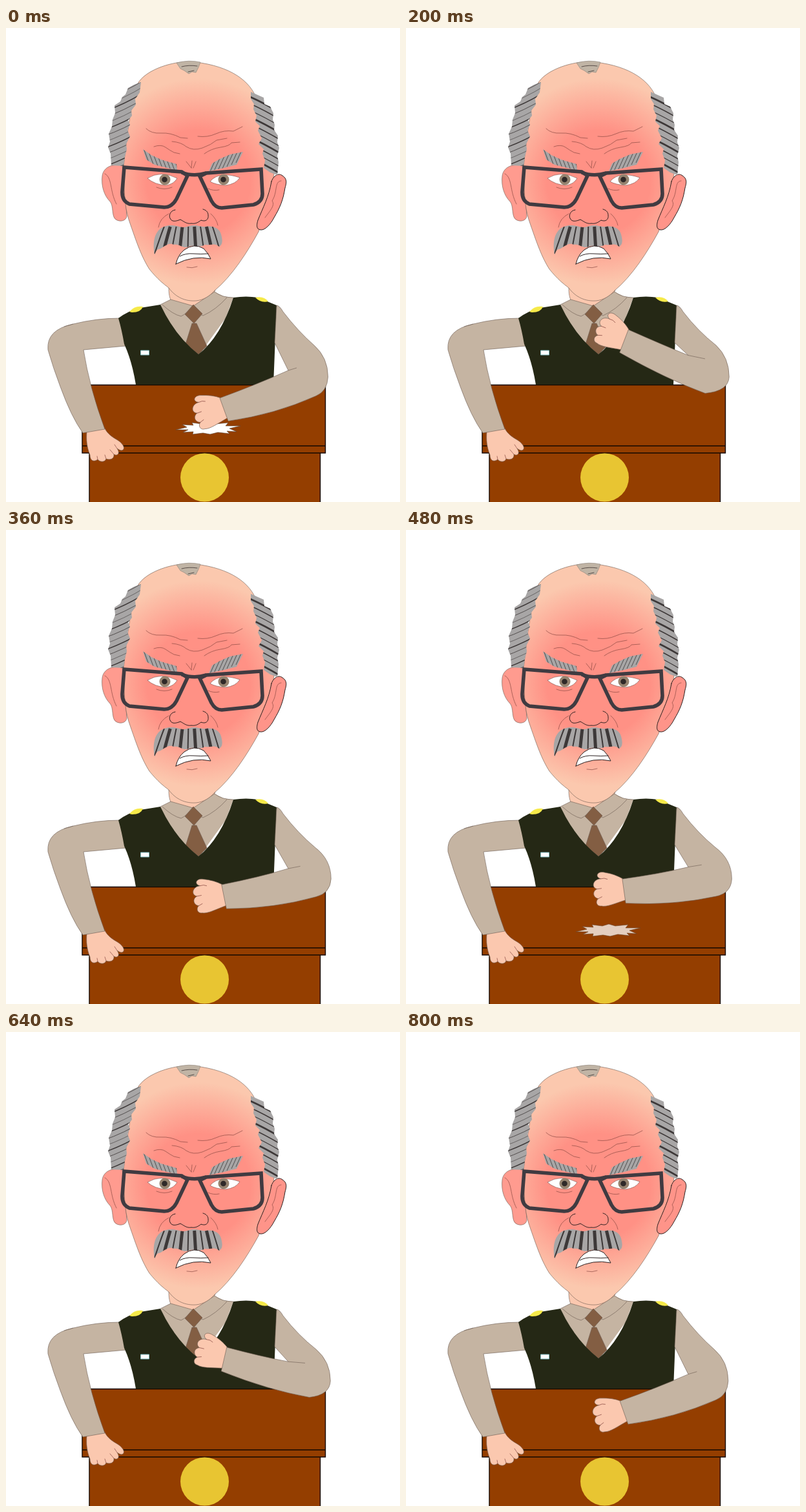
Animation of 610x735 px, one loop 840 ms. Source, as an HTML page:

```html
<!DOCTYPE html>
<html lang="en">
<head>
<meta charset="utf-8">
<title>Angry speech</title>
<style>
html, body { margin: 0; width: 100%; height: 100%; overflow: hidden; background: #fff; }
svg { display: block; width: 100vw; height: 100vh; }
.thin { stroke: #6b5a50; stroke-width: .6; }
.line { fill: none; stroke: #8a4a42; stroke-width: .7; stroke-linecap: round; }
.skin { fill: #fbc8af; }
.cloth { fill: #c5b4a2; }
.hair { fill: #a8a6a6; }
.wood { fill: #943e00; stroke: #140800; stroke-width: 1.4; }
.rim { fill: none; stroke: #403b41; stroke-width: 5.6; stroke-linejoin: miter; }
.ink { fill: none; stroke: #2a2020; stroke-width: 1; stroke-linecap: round; }
</style>
</head>
<body>
<svg viewBox="0 0 610 735">
  <defs>
    <radialGradient id="flush" gradientUnits="userSpaceOnUse" cx="298" cy="238" r="160">
      <stop offset=".5" stop-color="#ff9185"/>
      <stop offset="1" stop-color="#fbc8ae"/>
    </radialGradient>
    <clipPath id="cutLeft"><path id="hairLeft" d="M209 84L198 88L189 93L185 103L180 107L177 114L168 120L169 132L165 142L164 153L159 164L161 176L158 185L162 195L163 213L182 214L184 200L187 188L186 180L192 168L188 158L192 150L189 143L195 136L194 128L201 119L200 110L207 100Z"/></clipPath>
    <clipPath id="cutRight"><path id="hairRight" d="M379 99L390 104L399 108L400 118L409 122L414 132L413 142L416 150L415 158L421 167L420 177L423 186L420 198L422 208L420 228L409 224L399 217L401 205L397 195L399 188L391 180L396 171L390 159L393 152L386 145L388 136L383 126L384 118L379 110Z"/></clipPath>
    <clipPath id="cutBrowL"><path id="browL" d="M212 188L225 197L240 204L264 211L265 221L246 216L230 212L217 204Z"/></clipPath>
    <clipPath id="cutBrowR"><path id="browR" d="M367 192L347 196L331 203L319 210L314 222L338 217L357 212Z"/></clipPath>
    <clipPath id="cutTache"><path id="tache" d="M230 352C227 335 229 320 238 312C248 304 258 306 265 307C273 310 278 309 284 307C294 304 301 309 309 308C321 306 331 311 333 320C336 331 335 336 330 339C322 332 316 338 308 336C298 342 292 335 283 339C275 343 268 334 260 336C250 331 243 342 236 343C233 344 231 348 230 352Z"/></clipPath>
  </defs>
  <rect width="610" height="735" fill="#fff"/>

  <!-- neck, shirt, tie -->
  <path class="skin thin" d="M252 402C252 412 253 418 256 424L290 432L318 421L324 406Z"/>
  <path class="cloth" d="M239 429L255 421L290 431L323 409L337 416L352 418L340 450L298 508L255 470Z"/>
  <path class="thin" fill="none" d="M239 429L255 421L290 431L323 409Q334 418 352 418"/>
  <path class="thin" fill="none" d="M242 429Q258 444 271 447Q280 443 290 430Q298 444 305 446Q325 437 342 418"/>
  <path class="thin" fill="#835e43" d="M290 429L304 443L291 458L277 444Z"/>
  <path class="thin" fill="#835e43" d="M288 458L295 458L311 493L298 506L278 490Z"/>

  <!-- head -->
  <path class="thin" fill="#ff9b8f" d="M180 213C164 210 151 216 149 229C147 245 152 260 161 269C167 276 163 292 170 297C178 302 187 298 187 291L183 240Z"/>
  <path class="line" d="M153 226C165 232 160 252 171 273"/>
  <path class="thin" fill="url(#flush)" d="M283 52C250 53 215 67 204 86C190 130 185 190 182 215C183 250 183 275 190 297C203 335 210 355 222 374C235 390 243 396 252 403C263 418 278 424 294 423C306 422 316 415 322 408C350 385 374 347 391 316C400 290 410 260 415 226C400 190 396 140 386 105C374 78 340 56 283 52Z"/>
  <path class="ink" style="fill:#ff9489" d="M411 238C414 229 422 224 428 229C436 234 434 241 432 248C429 267 424 279 415 294C410 304 401 314 394 313C387 312 388 305 390 298C398 278 407 262 411 238Z"/>
  <path class="line" d="M426 237C415 238 421 254 412 268C417 275 409 283 401 294"/>
  <g id="locks"></g>
  <path fill="#c0b4a5" stroke="#8c8177" stroke-width=".6" d="M264 54Q283 49 301 53L298 61L294 69L288 68L283 71L276 66L270 63Z"/>
  <path class="ink" style="stroke-width:.7" d="M272 60Q283 57 296 59M282 68L291 66"/>

  <path class="line" d="M217 156Q225 164 240 163T270 170L281 171M297 168Q312 170 325 164T352 160L366 153M257 176Q271 177 279 184Q290 191 304 186T326 174L342 171M229 184Q240 180 247 185T260 193L269 195M307 195Q318 187 332 185T349 178L362 177M279 207L287 217M288 206L287 217M294 207L290 217"/>
  <path class="line" d="M233 247Q245 252 257 247M313 249Q321 253 330 251M252 288Q238 295 236 309M317 288Q326 296 328 306M280 371Q288 373 296 370"/>
  <path class="ink" d="M262 282C254 283 252 291 254 295C257 302 265 299 270 297C277 301 280 304 287 303C294 304 298 301 302 298C309 301 314 297 313 290C313 285 309 282 305 281"/>

  <g stroke="#7c4a44" stroke-width=".6">
    <path fill="#fff" d="M219 233Q240 220 265 233Q260 242 248 244Q230 243 219 233Z"/>
    <path fill="#fff" d="M316 238Q330 221 362 232Q356 242 340 244Q324 243 316 238Z"/>
  </g>
  <g fill="#95836f"><circle cx="246" cy="235" r="8.500"/><circle cx="337" cy="235" r="8.500"/></g>
  <g fill="#2f2928"><circle cx="245.500" cy="235" r="4.300"/><circle cx="336.500" cy="235" r="4.300"/></g>
  <path class="rim" d="M183 216L272 223L281 229L264 265Q257 278 245 278L191 273Q179 268 180 253Z"/>
  <path class="rim" d="M300 230L310 225L395 219L397 257Q397 270 383 274L334 279Q324 279 318 268Z"/>
  <path class="rim" d="M272 224Q290 231 310 225"/>

  <g id="shut">
    <path class="ink" style="fill:#fff" d="M263 366Q266 352 276 344Q291 333 306 342Q313 349 317 358Q290 352 263 366Z"/>
    <path class="ink" d="M269 354Q278 349 290 350T313 350"/>
  </g>
  <g id="open">
    <path class="ink" style="fill:#000" d="M263 366Q266 352 276 344Q291 333 306 342Q314 350 318 360Q292 367 263 366Z"/>
    <path fill="#fff" d="M273 348.500Q287 333 303 345Q287 350 273 348.500ZM264 366Q272 360 290 358L317 357L318 360Q292 367 264 366Z"/>
  </g>

  <!-- desk -->
  <path class="wood" d="M129 659H486.500V740H129ZM118 553.500H494.500V659H118ZM118 648H494.500"/>
  <circle cx="307.500" cy="697" r="37.500" fill="#e8c532"/>
  <path id="crack" fill="#fff" stroke="#5a4436" stroke-width=".6" d="M263 623L280 619L273 615L290 616L288 612L304 614L314 611L324 614L344 612L340 617L363 617L346 621L357 626L342 625L346 629L328 627L316 630L305 628L289 630L290 626L274 627L282 623Z"/>

  <!-- resting arm -->
  <path class="skin thin" d="M125 626L153 621C157 629 164 634 171 638C180 643 184 650 182 653C180 657 175 654 172 652C178 661 171 664 167 661C168 669 160 670 155 668C153 674 145 673 142 669C135 674 130 670 130 662C125 650 124 638 125 626Z"/>
  <path class="line" d="M172 652L168 646M167 661L161 654M155 668L153 662M142 669L141 664"/>
  <path class="cloth thin" d="M176 450Q140 450 104 459Q62 468 65 499Q73 527 84 556Q101 603 119 628L153 622Q129 557 120 499L186 493Z"/>
  <path class="thin" fill="none" d="M90 463L104 459"/>

  <!-- sweater -->
  <path fill="#252815" d="M174 450Q190 438 208 434L239 429Q262 478 298 506Q333 478 352 418Q372 415 390 418L419 430L414 553H201Q195 516 183 490Q179 467 174 450Z"/>
  <path fill="#f6ea4a" d="M191 440Q199 430 212 432Q209 441 195 441ZM386 418Q399 415 406 424Q395 427 386 418Z"/>
  <path fill="#fff" stroke="#7fbcc2" d="M208.500 500H221.500V507H208.500Z"/>

  <!-- striking arm -->
  <g id="fist">
    <path class="skin thin" d="M1-19C-6-25-16-30-26-33C-37-37-42-28-33-24C-45-25-50-13-41-9C-50-6-48 4-41 6C-47 10-45 18-38 18C-30 21-17 17 1 14Z"/>
    <path class="line" d="M-33-24Q-27-25-23-22M-41-9L-34-9M-41 6L-35 4"/>
  </g>
  <path id="sleeve" class="cloth thin"/>
  <path id="crease" class="thin" fill="none"/>
</svg>
<script>
const $ = id => document.getElementById(id);
const STEP = 40, LOOP = 840;

// Draws a lock of hair with n strands clipped to its shape.
function lock(shape, clip, n, strand) {
  let s = `<path class="hair" d="${$(shape).getAttribute("d")}"/><g clip-path="url(#${clip})" stroke="#3d3838" fill="none">`;
  for (let i = 0; i < n; i++) {
    const [d, w] = strand(i);
    s += `<path d="${d}" stroke-width="${w}"/>`;
  }
  $("locks").innerHTML += s + "</g>";
}
lock("hairLeft", "cutLeft", 13, i => {
  const y = 95 + i * 9.500;
  return [`M150 ${y + 16}Q183 ${y + 5} 215 ${y - 15}`, [.8, .6, 1.5][i % 3]];
});
lock("hairRight", "cutRight", 12, i => {
  const y = 97 + i * 10.500;
  return [`M375 ${y - 2}Q400 ${y + 9} 428 ${y + 26}`, [1.2, 2.6, 1.6][i % 3]];
});
lock("browL", "cutBrowL", 8, i => [`M${212 + i * 7} ${184 + i * 3}l9 24`, .8]);
lock("browR", "cutBrowR", 8, i => [`M${324 + i * 7} ${205 - i * 3}l-10 22`, .8]);
lock("tache", "cutTache", 9, i => {
  const x = 240 + i * 10.500, lean = (285 - x) * .22;
  return [`M${x + lean * .5} 308Q${x} 320 ${x - lean} 350`, i % 2 ? 5 : 2];
});

// Piecewise linear value through [time, value] pairs.
function along(keys, t) {
  for (let i = 1; i < keys.length; i++) {
    const [t0, v0] = keys[i - 1], [t1, v1] = keys[i];
    if (t <= t1) return v0 + (v1 - v0) * (t - t0) / (t1 - t0);
  }
  return keys[keys.length - 1][1];
}
const swing = [[0, 20], [40, 18], [80, 8], [120, -2], [200, -21], [400, 19.500],
  [440, 18], [480, 8], [560, -10.700], [600, -21], [800, 19.500], [840, 20]];
const fade = [[0, 1], [40, 1], [200, 0], [400, 0], [440, 1], [600, 0], [840, 0]];

function poseArm(deg) {
  const a = deg * Math.PI / 180;
  const down = Math.max(0, deg) / 20, up = Math.max(0, -deg) / 20;
  const cx = 337.500, cy = 540 + 142 * Math.tan(a);
  const sx = 19 * Math.sin(a), sy = 19 * Math.cos(a);
  const top = [cx - sx, cy - sy], low = [cx + sx, cy + sy];
  const ex = 505.500 - 7 * down * down - 5 * up;
  const bx = 480 - 16 * up, by = 566.500 + 4 * down;
  const kx = 437, ky = 517 + 14 * down - 9 * up;
  const px = 463 - 13 * down, py = 514 + 13 * down - up;
  const mid = (p, x, y, dx, dy) => `${(p[0] + x) / 2 + dx} ${(p[1] + y) / 2 + dy}`;
  $("sleeve").setAttribute("d", `M419 430Q424 431 429 440Q452 470 ${480 - 3 * down} 492` +
    `Q${ex} 511 ${ex} 541Q${ex - 1} 563 ${bx} ${by}Q${mid(low, bx, by, 5, 9)} ${low}` +
    `L${top}Q${mid(top, kx, ky, 5, 3 - 3 * down)} ${kx} ${ky}L416 488Z`);
  $("crease").setAttribute("d", `M${kx} ${ky}L${px} ${py}`);
  $("fist").setAttribute("transform", `translate(${cx} ${cy}) rotate(${-deg})`);
}

function draw(now) {
  const t = Math.floor(now % LOOP / STEP) * STEP;
  poseArm(along(swing, t));
  $("crack").setAttribute("opacity", along(fade, t));
  const shout = t % 200 === 120;
  $("open").style.display = shout ? "" : "none";
  $("shut").style.display = shout ? "none" : "";
}

let start;
function tick(now) {
  start ??= now;
  draw(Math.max(0, now - start));
  requestAnimationFrame(tick);
}
draw(0);
requestAnimationFrame(tick);
</script>
</body>
</html>
```
